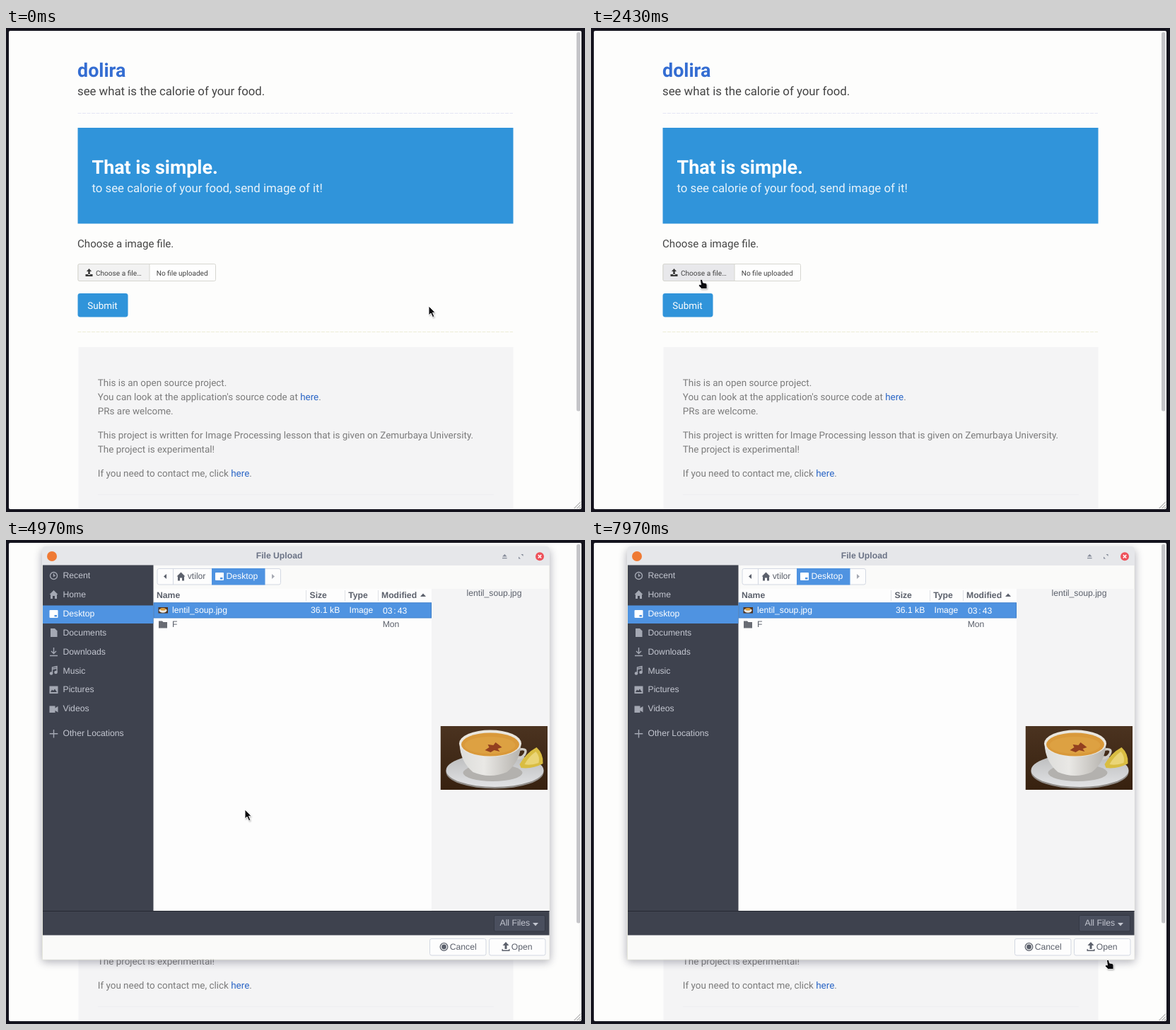
Animation, 819 px wide and 684 px high, one loop 8 s. Source, as an HTML page:

```html
<!DOCTYPE html>
<html lang="en">
<head>
<meta charset="utf-8">
<title>Upload a meal</title>
<style>
html, body { margin: 0; width: 100%; height: 100%; overflow: hidden; background: #14131d; }
svg { display: block; width: 100vw; height: 100vh; }
text { text-rendering: geometricPrecision; white-space: pre; }
#page { font-family: Roboto, sans-serif; font-size: 13.44px; fill: #444; }
.h1 { font-size: 26.88px; font-weight: 700; }
.h2 { font-size: 16.8px; }
.h3 { font-size: 15.12px; }
.small { font-size: 10.08px; }
.info { fill: #7b7b7b; }
.link { fill: #2b66c6; }
#dialog { font-family: "Liberation Sans", Arial, sans-serif; font-size: 12.2px; fill: #5c616c; }
.bold { font-weight: 700; }
.side { fill: #c3c6d0; }
.icon { fill: #a4a8b3; }
.line { fill: none; stroke: #a4a8b3; stroke-width: 1.4; }
.white { fill: #fff; }
.box { fill: #fdfdfd; stroke: #d3d8e2; }
</style>
</head>
<body>
<svg viewBox="0 0 819 684" preserveAspectRatio="none">
<defs>
  <filter id="blur" x="-10%" y="-10%" width="120%" height="120%"><feGaussianBlur stdDeviation="6"/></filter>
  <filter id="soft" x="-50%" y="-50%" width="200%" height="200%"><feGaussianBlur stdDeviation="1"/></filter>
  <clipPath id="outside"><path clip-rule="evenodd" d="M4 4H814V680H4zM51 36V593H769V36V14Q769 9 764 9H56Q51 9 51 14z"/></clipPath>
  <clipPath id="photoClip"><rect width="151.5" height="90"/></clipPath>
  <linearGradient id="wood" x2="0" y2="1"><stop stop-color="#4b3320"/><stop offset="1" stop-color="#37210f"/></linearGradient>
  <linearGradient id="china" x2="1" y2="0"><stop stop-color="#dcdcda"/><stop offset=".4" stop-color="#e9e8e5"/><stop offset="1" stop-color="#b5b2ad"/></linearGradient>
  <linearGradient id="plate" x2="0" y2="1"><stop stop-color="#b9babb"/><stop offset="1" stop-color="#e2e3e5"/></linearGradient>
  <path id="upload" d="M0 8H3.5V9H6.5V8H10V11H0zM5 0L8.6 4H6.3V8H3.7V4H1.4z"/>
  <path id="house" d="M0 6L6 0L12 6H10.5V12H7.5V8H4.5V12H1.5V6z"/>
  <path id="desk" fill-rule="evenodd" d="M1 0H11Q12 0 12 1V10Q12 11 11 11H1Q0 11 0 10V1Q0 0 1 0zM7 7V9.5H10.5V7z"/>
</defs>

<rect width="819" height="684" fill="#14131d"/>
<rect x="4" y="4" width="810" height="676" rx="2" fill="#fdfdfc"/>

<g id="page">
  <text class="h1" x="101" y="69" fill="#346dd2">dolira</text>
  <text class="h2" x="101" y="95">see what is the calorie of your food.</text>
  <path d="M101.5 120.5H717" stroke="#e4e5f4" stroke-dasharray="5 1.5"/>
  <rect x="101.5" y="141" width="616" height="135.5" fill="#3094da"/>
  <text class="h1 white" x="121.5" y="206">That is simple.</text>
  <text class="h2" x="121.5" y="232" fill="#e7f3fb">to see calorie of your food, send image of it!</text>
  <text class="h3" x="101" y="310">Choose a image file.</text>

  <rect x="102" y="333.5" width="194.5" height="24" rx="2" fill="#fefefe" stroke="#d6d6d0"/>
  <path id="choose" d="M203 333.5H104Q102 333.5 102 335.5V355.5Q102 357.5 104 357.5H203z" stroke="#d6d6d0"/>
  <use href="#upload" x="112.5" y="340" fill="#3a3a3a"/>
  <text class="small" x="127" y="349.7">Choose a file…</text>
  <text class="small" x="212.7" y="349.7">No file uploaded</text>

  <rect x="101.5" y="375" width="71" height="33.5" rx="3.4" fill="#3094da"/>
  <text class="white" x="115.3" y="397">Submit</text>
  <path d="M101.5 429.5H717" stroke="#ededd6" stroke-dasharray="5 1.5"/>

  <rect x="102.5" y="451" width="615" height="229" fill="#f4f4f5"/>
  <path d="M130 659.5H690" stroke="#eeeef1"/>
  <g class="info">
    <text x="129.8" y="506">This is an open source project.</text>
    <text x="129.8" y="526">You can look at the application's source code at <tspan class="link">here</tspan>.</text>
    <text x="129.8" y="546">PRs are welcome.</text>
    <text x="129.8" y="580">This project is written for Image Processing lesson that is given on Zemurbaya University.</text>
    <text x="129.8" y="600">The project is experimental!</text>
    <text x="129.8" y="634">If you need to contact me, click <tspan class="link">here</tspan>.</text>
  </g>
  <rect x="807" y="6" width="5.5" height="535.5" rx="2.5" fill="#c5c5c9"/>
  <path d="M803.5 679L813 669.5M807.5 679L813 673.5M811 679L813 677" stroke="#8a8a8a"/>
</g>

<g id="dialog">
  <g clip-path="url(#outside)"><rect x="50" y="13" width="720" height="584" rx="6" fill="#47465c" opacity=".38" filter="url(#blur)"/></g>
  <path d="M51.5 36V593H768.5V36" fill="none" stroke="#e6e7dc"/>
  <path d="M51 36V14Q51 9 56 9H764Q769 9 769 14V36z" fill="#e6e7ea"/>
  <circle cx="65" cy="23" r="7" fill="#ef7a34"/>
  <text class="bold" x="353.7" y="25.7" fill="#6b7386">File Upload</text>
  <path d="M702 23.5L705.3 20L708.6 23.5zM702 25H708.6V26.3H702zM728.5 20H731.5V23zM725 23.5V26.5H728z" fill="#858b99"/>
  <circle cx="755" cy="23.3" r="6" fill="#ee515a"/>
  <path d="M752.8 21.1L757.2 25.5M757.2 21.1L752.8 25.5" stroke="#fff" stroke-width="1.5"/>

  <g id="content">
    <rect x="52" y="36" width="716.5" height="556.5" fill="#fafaf9"/>
    <rect x="208" y="69" width="394" height="455" fill="#fdfdfd"/>
    <rect x="602" y="69" width="166.5" height="455" fill="#f4f4f5"/>
    <rect x="52" y="35.5" width="156.5" height="488.5" fill="#3e424e"/>
    <rect x="52" y="92.5" width="156.5" height="25.5" fill="#4f93e1"/>

    <circle class="line" cx="67.5" cy="50.5" r="5"/>
    <path class="line" d="M67.5 47.5V51L69.5 50"/>
    <use class="icon" href="#house" x="61.5" y="71"/>
    <use class="white" href="#desk" x="61.5" y="99"/>
    <path class="icon" d="M63 125H69L72.5 128.5V137H63z"/>
    <path class="line" d="M67.5 152V160M64 157L67.5 160.5L71 157M62 163.5H73"/>
    <path class="line" d="M65.5 188V180L72 178.7V187M65.5 182.5L72 181"/>
    <g class="icon"><circle cx="64" cy="188.5" r="2.3"/><circle cx="70.5" cy="187" r="2.3"/></g>
    <path class="icon" fill-rule="evenodd" d="M61.5 206.5H73.5V217H61.5zM63 215H72L69 210.5L67 213L65 211.5z"/>
    <path class="icon" d="M61.5 234.5H69.5V237.5L73.5 235V243.5L69.5 241V244H61.5z"/>
    <path class="line" d="M67.5 268V279.5M61.7 273.7H73.3"/>
    <g class="side">
      <text x="80.5" y="54">Recent</text>
      <text x="80.5" y="81">Home</text>
      <text class="white" x="80.5" y="108">Desktop</text>
      <text x="80.5" y="134.7">Documents</text>
      <text x="80.5" y="161.5">Downloads</text>
      <text x="80.5" y="188.5">Music</text>
      <text x="80.5" y="215">Pictures</text>
      <text x="80.5" y="242">Videos</text>
      <text x="80.5" y="276.5">Other Locations</text>
    </g>

    <rect class="box" x="214" y="40.5" width="174.5" height="22.5" rx="2.5"/>
    <path d="M236.5 40.5V63" stroke="#d3d8e2"/>
    <rect x="291" y="40" width="75.5" height="23.5" fill="#4f93e1"/>
    <path d="M227 48V55L223 51.5z"/>
    <path d="M376 48V55L380 51.5z" fill="#a5a9b2"/>
    <use href="#house" x="241.5" y="45.5"/>
    <text x="256.7" y="55">vtilor</text>
    <use class="white" href="#desk" x="296" y="46"/>
    <text class="white" x="311.5" y="55">Desktop</text>

    <path d="M424.5 71V86M479.5 71V86M526.5 71V86" stroke="#dfe1e6"/>
    <g class="bold">
      <text x="213" y="81.5">Name</text>
      <text x="429.5" y="81.5">Size</text>
      <text x="484.3" y="81.5">Type</text>
      <text x="531" y="81.5">Modified</text>
    </g>
    <path d="M586 80L590 75.5L594 80z"/>
    <rect x="209" y="88.8" width="392.5" height="21.2" fill="#4f93e1" stroke="#3f80cb"/>
    <rect x="215.5" y="95" width="13.5" height="8.5" fill="#51341f"/>
    <ellipse cx="222" cy="99.5" rx="5.5" ry="3.3" fill="#ecebe7"/>
    <ellipse cx="222" cy="98" rx="4" ry="1.7" fill="#dd9a33"/>
    <g class="white">
      <text x="235" y="102.5">lentil_soup.jpg</text>
      <text x="431" y="102.5">36.1 kB</text>
      <text x="485.5" y="102.5">Image</text>
      <text x="533" y="104">03</text><text x="548.3" y="103.5">:</text><text x="553.7" y="104">43</text>
    </g>
    <path d="M216 114.5H221L222.5 116H228V124.5H216z" fill="#696c74"/>
    <text x="235" y="122.5">F</text>
    <text x="532.7" y="122.5">Mon</text>

    <text x="651.5" y="78.7">lentil_soup.jpg</text>
    <g transform="translate(614.5 263)" clip-path="url(#photoClip)">
      <rect width="152" height="90" fill="url(#wood)"/>
      <ellipse cx="77" cy="65" rx="69" ry="23.5" fill="#8f8b87"/>
      <ellipse cx="77" cy="62.5" rx="69" ry="23.5" fill="url(#plate)"/>
      <ellipse cx="74" cy="66" rx="42" ry="12" fill="#b3b1ae"/>
      <path d="M112 54Q121 38 136 30Q146 39 145 53Q130 61 114 59z" fill="#d9bd42"/>
      <path d="M119 54Q125 43 135 36Q141 43 139 52Q128 56 119 54z" fill="#ead577"/>
      <path d="M112 33Q124 31 119 40Q116 45 108 46" fill="none" stroke="#d0cdc7" stroke-width="3.5"/>
      <path d="M27 25Q28 50 46 65Q70 75 94 65Q113 50 114 25z" fill="url(#china)"/>
      <ellipse cx="70.5" cy="24.5" rx="44" ry="19" fill="#e9e6de"/>
      <ellipse cx="70.5" cy="26" rx="41" ry="16.5" fill="#d9993a"/>
      <ellipse cx="70" cy="27" rx="36" ry="12" fill="#dda142"/>
      <path d="M63 34L69 30L67 26L75 27L78 23L82 26L87 30L81 32L84 36L76 34L71 37z" fill="#93401f"/>
    </g>

    <rect x="52" y="524" width="716.5" height="34.5" fill="#3e424e"/>
    <path d="M52 524.5H768.5" stroke="#262932"/>
    <rect x="690.5" y="530.5" width="72" height="22.5" rx="2" fill="#4a4f5e" stroke="#343844"/>
    <text class="side" x="698.5" y="544.7">All Files</text>
    <path class="side" d="M745 541H753L749 545.5z"/>
    <rect class="box" x="599.5" y="563.5" width="79.5" height="23.5" rx="2.5"/>
    <rect class="box" x="683.5" y="563.5" width="79.5" height="23.5" rx="2.5"/>
    <circle cx="619.5" cy="575" r="5.3" fill="none" stroke="#5c616c" stroke-width="1.3"/>
    <circle cx="619.5" cy="575" r="3.4"/>
    <text x="627.7" y="578.5">Cancel</text>
    <path d="M707 568L711.5 573H708.5V578H705.5V573H702.5zM701.5 578V581H712.5V578H711.2V579.5H702.8V578z"/>
    <text x="714.8" y="578.5">Open</text>
  </g>
</g>

<g id="cursor">
  <g id="arrow" transform="scale(.92)">
    <path d="M1 2V16L4.3 13L7 19L9.5 18L7 12H11z" opacity=".3" filter="url(#soft)"/>
    <path d="M0 0V14L3.3 11L6 17L8.5 16L6 10H10z" fill="#0b0b0e" stroke="#fff"/>
  </g>
  <g id="hand">
    <path d="M-2 7H9V15H0z" opacity=".3" filter="url(#soft)"/>
    <path d="M-1.5 1Q0 -.5 1.5 1L2.5 5L6 5.5Q8 6 8 8V12.5Q8 13.5 7 13.5H.5L-3.5 9.5Q-4 7.500 -2 7.500L-.5 8z" fill="#0b0b0e" stroke="#fff" stroke-width=".8"/>
  </g>
</g>
</svg>
<script>
const LOOP = 8000, DIALOG_AT = 3300, CONTENT_AT = 3720;
// Pointer path: time, x, y
const path = [
  [0, 598, 393], [1370, 393, 386], [2300, 157, 356], [2430, 156, 355], [2700, 155, 353],
  [4050, 155, 353], [4780, 262, 365], [5600, 652, 436], [5800, 676, 411], [6480, 676, 411],
  [7000, 655, 490], [7300, 663, 565], [7600, 742, 600], [7960, 731, 593], [8000, 731, 593]
];
const $ = id => document.getElementById(id);
const show = (id, on) => $(id).style.display = on ? "" : "none";

// Slope at a key; zero at rests and turning points
function slope(i, axis) {
  const a = path[i - 1], b = path[i], c = path[i + 1];
  if (!a || !c || (b[axis] - a[axis]) * (c[axis] - b[axis]) <= 0) return 0;
  return (c[axis] - a[axis]) / (c[0] - a[0]);
}

function along(t, axis) {
  const i = path.findIndex((p, n) => n === path.length - 2 || t < path[n + 1][0]);
  const a = path[i], b = path[i + 1], d = b[0] - a[0], u = (t - a[0]) / d;
  const s = u * u * (3 - 2 * u), v = 1 - u;
  return a[axis] + (b[axis] - a[axis]) * s
    + d * u * v * (v * slope(i, axis) - u * slope(i + 1, axis));
}

function draw(t) {
  const x = along(t, 1), y = along(t, 2);
  const hover = x < 203 && y < 358;
  const hand = t < DIALOG_AT ? hover : y > 590;
  $("choose").setAttribute("fill", hover && t < CONTENT_AT ? "#e8e8eb" : "#f2f2f2");
  show("dialog", t >= DIALOG_AT);
  show("content", t >= CONTENT_AT);
  show("hand", hand);
  show("arrow", !hand);
  $("cursor").setAttribute("transform", `translate(${Math.round(x)} ${Math.round(y)})`);
}

const start = performance.now();
function tick() {
  draw((performance.now() - start) % LOOP);
  requestAnimationFrame(tick);
}
tick();
</script>
</body>
</html>
```
